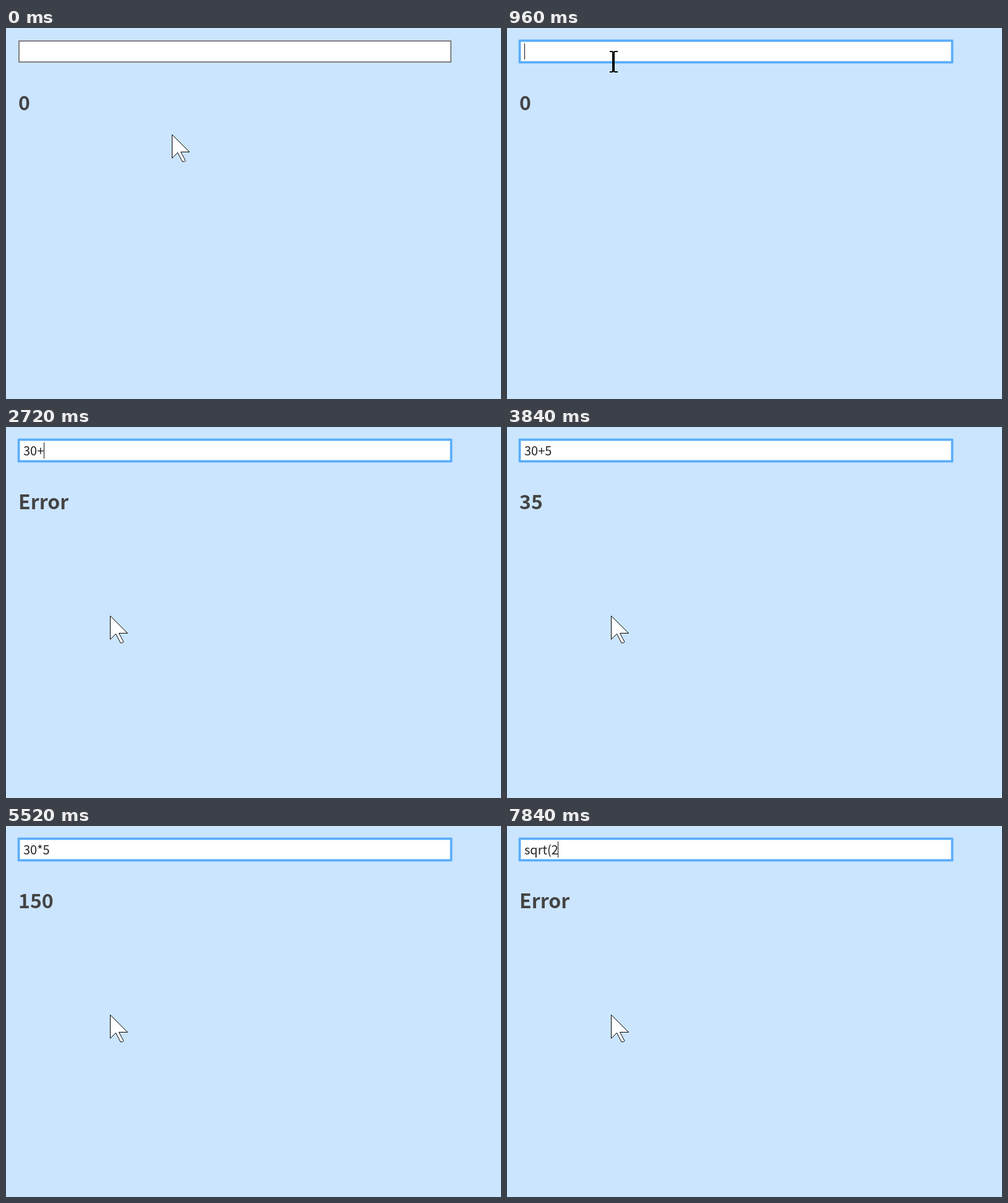
An HTML page that plays this animation: 800 px wide and 600 px high, repeating every 8 s.

```html
<!DOCTYPE html>
<html lang="en">
<head>
<meta charset="utf-8">
<title>Live calculator</title>
<style>
  html, body { margin: 0; width: 100%; height: 100%; overflow: hidden; background: #cbe5ff; }
  svg { display: block; width: 800px; height: 600px; }
  text { font-family: "Noto Sans CJK JP", "Noto Sans CJK SC", "Noto Sans CJK", sans-serif; white-space: pre; }
  #entry { font-size: 20px; fill: #222; }
  #result { font-size: 32px; font-weight: 700; fill: #444; }
</style>
</head>
<body>
<svg viewBox="0 0 800 600">
  <rect width="800" height="600" fill="#cbe5ff"/>
  <rect x="21" y="21" width="698" height="34" fill="#fff" stroke="#808080" stroke-width="2"/>
  <g id="focus" fill="none" stroke="#58afff">
    <rect x="20.5" y="20.5" width="699" height="35" rx="1" stroke-width="5" stroke-opacity=".4"/>
    <rect x="20.5" y="20.5" width="699" height="35" stroke-width="3" stroke-opacity=".9"/>
  </g>
  <text id="entry" x="28" y="46"></text>
  <rect id="caret" y="25" width="1" height="26" fill="#111"/>
  <text id="result" x="20" y="133"></text>
  <path id="arrow" fill="#fff" stroke="#000"
    d="M.5 .5V38.5L9.5 29.5L17 44H20.5L22 42.5L14.5 28.5H28.5Z"/>
  <path id="beam" fill="none" stroke="#000" stroke-width="2"
    d="M-6 -16H-2L0 -14L2 -16H7M-6 17H-2L0 15L2 17H7M-1 -15V16M1 -15V16"/>
</svg>
<script>
const LOOP = 8000, STEP = 80;
const $ = id => document.getElementById(id);
const [focusRing, entry, caret, result, arrow, beam] =
  ["focus", "entry", "caret", "result", "arrow", "beam"].map($);

// Each edit: time, field contents, displayed result
const edits = [
  [0, "", "0"], [2080, "3", "3"], [2160, "30", "30"], [2720, "30+", "Error"],
  [3280, "30+5", "35"], [4080, "30+", "Error"], [4240, "30", "30"],
  [4640, "30*", "Error"], [4960, "30*5", "150"], [5600, "30*", "Error"],
  [5760, "30", "30"], [5920, "3", "3"], [6080, "", "Error"],
  [6560, "s", "Error"], [6720, "sq", "Error"], [6960, "sqr", "Error"],
  [7200, "sqrt", "Error"], [7520, "sqrt(", "Error"], [7840, "sqrt(2", "Error"]
];
const FOCUS_AT = 960, BLINK = 560;
const start = [268, 172], inField = [172, 54];
const sweep = [inField, [196, 98], [246, 176], [300, 264], [335, 332],
  [333, 365], [284, 355], [212, 324], [168, 305]];

const mix = (a, b, k) => a.map((v, i) => Math.round(v + (b[i] - v) * k));
const ease = k => k * k * (3 - 2 * k);
const show = (el, on) => el.setAttribute("visibility", on ? "visible" : "hidden");

function pointerAt(t) {
  const moved = from => Math.max(0, Math.floor((t - from) / STEP) + 1);
  if (t < 1120) return mix(start, inField, ease(Math.min(1, moved(320) / 6)));
  return sweep[Math.min(sweep.length - 1, moved(1120))];
}

function render(t) {
  const [editTime, value, answer] = edits.filter(e => e[0] <= t).pop();
  if (entry.textContent !== value) entry.textContent = value;
  if (result.textContent !== answer) result.textContent = answer;

  const focused = t >= FOCUS_AT;
  const idle = t - Math.max(editTime, FOCUS_AT);
  show(focusRing, focused);
  show(caret, focused && Math.floor(idle / BLINK) % 2 === 0);
  const width = value ? entry.getComputedTextLength() : 0;
  caret.setAttribute("x", Math.floor(28 + width));

  const [x, y] = pointerAt(t);
  const overField = x >= 20 && x < 720 && y >= 20 && y < 56;
  show(beam, overField);
  show(arrow, !overField);
  (overField ? beam : arrow).setAttribute("transform", `translate(${x} ${y})`);
}

const origin = performance.now();
function tick(now) {
  render(Math.max(0, now - origin) % LOOP);
  requestAnimationFrame(tick);
}
render(0);
requestAnimationFrame(tick);
</script>
</body>
</html>
```
